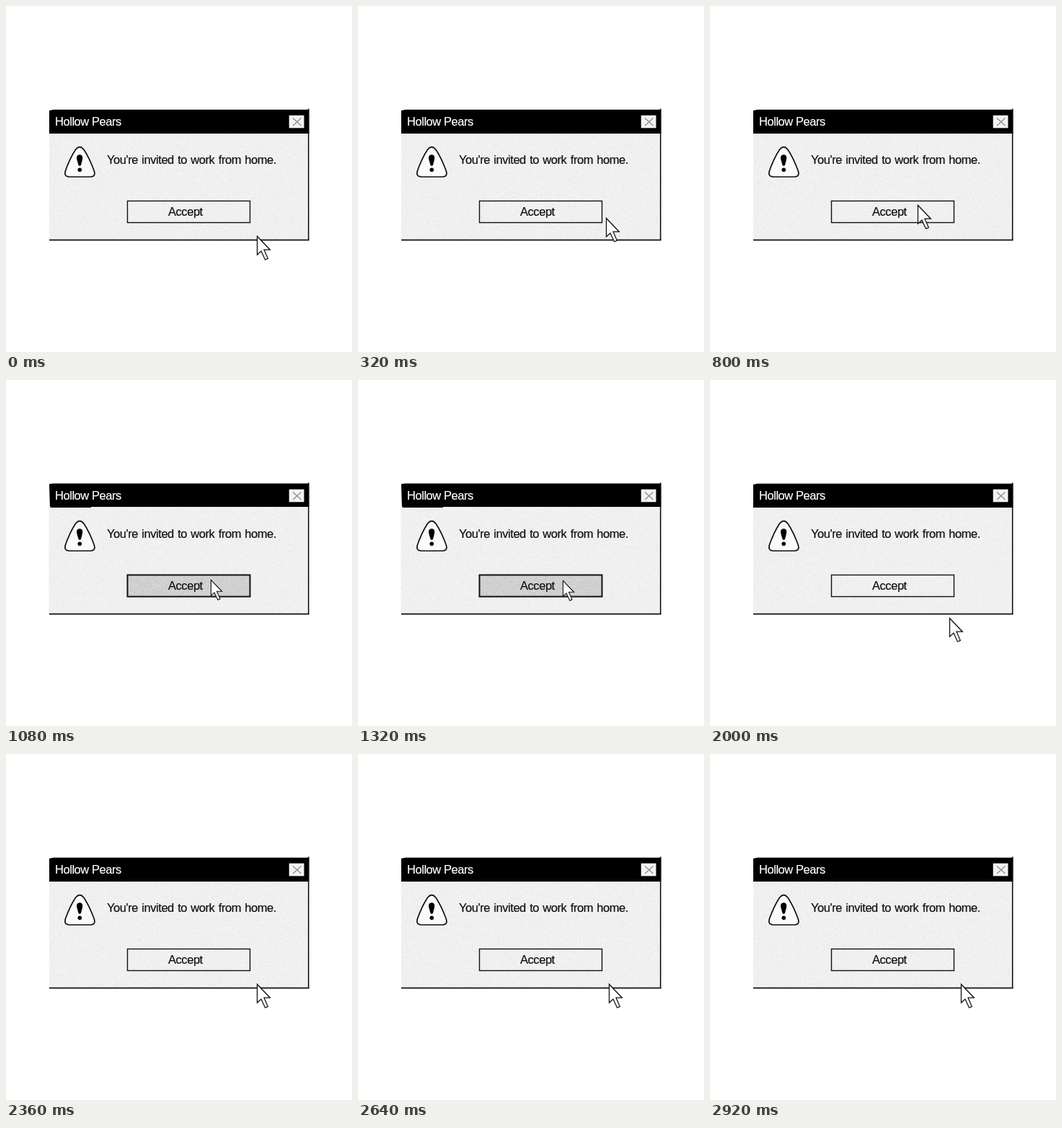
Animation of 480x480 px, one loop 2.96 s. Source, as an HTML page with a canvas:

```html
<!DOCTYPE html>
<html lang="en">
<head>
<meta charset="utf-8">
<title>Dialog invitation</title>
<style>
  html, body { margin: 0; width: 100%; height: 100%; overflow: hidden; background: #fff; }
  canvas, svg { position: absolute; left: 0; top: 0; width: 480px; height: 480px; }
  text {
    font-family: "Liberation Sans", Arial, sans-serif; font-size: 16.5px; letter-spacing: -.45px;
    fill: #111; stroke: #111; stroke-width: .2px;
  }
  .title { fill: #fff; stroke: #fff; }
  .message { word-spacing: 1.2px; }
</style>
</head>
<body>
<canvas id="panel" width="480" height="480"></canvas>
<svg viewBox="0 0 480 480">
  <path id="bar"/>
  <path d="M419.7 142.5V325" stroke="#111" stroke-width="1.6"/>
  <path d="M60 324.6H420.5" stroke="#111" stroke-width="1.6"/>
  <text class="title" x="68" y="165.5">Hollow Pears</text>

  <rect x="392.7" y="151.7" width="20.8" height="17.6" fill="#f3f3f3"/>
  <path d="M398 155.5L409.5 166M409.5 155.5L398 166" stroke="#8a8a8a" stroke-width="1.2"/>

  <path d="M96.3 199.5Q102.3 191.7 108.2 199.5Q116 211.5 122.2 228.5Q125 236.5 117.5 237H87.5Q80 236.5 82.5 228.5Q88.5 211.5 96.3 199.5Z"
        fill="#fbfbfb" stroke="#111" stroke-width="1.7"/>
  <path d="M102.2 206.3C106 206.3 107 209.5 105.9 213.5L104 220.8Q102.2 223 100.5 220.8L98.5 213.5C97.4 209.5 98.5 206.3 102.2 206.3Z"/>
  <circle cx="102.3" cy="227.3" r="2.8"/>

  <text class="message" x="140" y="218.8">You're invited to work from home.</text>
  <rect id="button" x="168.5" y="270.5" width="170" height="30" fill="none" stroke="#111"/>
  <text x="225" y="291.3">Accept</text>

  <path id="cursor" d="M.5 .5V26L6 21L11.5 33L15.3 31.3L10 19.2H18.3Z"
        fill="#fff" stroke="#111" stroke-width="1.3" stroke-linejoin="miter"/>
</svg>
<script>
const LOOP = 2960, STEP = 40;
const PRESS = 1040, RELEASE = 1480;

// time, x, y of the pointer tip
const path = [
  [0, 348, 319], [80, 348, 318], [320, 344, 294], [560, 314, 278],
  [800, 288, 276], [880, 285, 277], [1320, 284, 278], [1480, 285, 279],
  [1680, 296, 291], [1880, 319, 322], [2040, 336, 331], [2160, 346, 323],
  [2240, 348, 319], [2320, 348, 319], [LOOP, 348, 319]
];

const get = id => document.getElementById(id);
const ctx = get("panel").getContext("2d");
const bar = get("bar"), button = get("button"), cursor = get("cursor");

function random(seed) {
  return () => {
    seed = (Math.imul(seed, 1664525) + 1013904223) >>> 0;
    return seed / 4294967296;
  };
}

function makeGrain(size) {
  const tile = document.createElement("canvas");
  tile.width = tile.height = size;
  const c = tile.getContext("2d"), img = c.createImageData(size, size), rnd = random(7);
  for (let i = 0; i < img.data.length; i += 4) {
    const v = rnd() + rnd() - 1;
    img.data[i] = img.data[i + 1] = img.data[i + 2] = v > 0 ? 255 : 0;
    img.data[i + 3] = Math.abs(v) * (v > 0 ? 90 : 11);
  }
  c.putImageData(img, 0, 0);
  return tile;
}
const grain = makeGrain(512);

function slope(i, axis) {
  const a = path[i - 1], b = path[i + 1];
  return a && b ? (b[axis] - a[axis]) / (b[0] - a[0]) : 0;
}

function pointAt(t) {
  let i = 0;
  while (i < path.length - 2 && t >= path[i + 1][0]) i++;
  const a = path[i], b = path[i + 1], d = b[0] - a[0], u = (t - a[0]) / d;
  return [1, 2].map(k => Math.round(
    a[k] * (1 + 2 * u) * (1 - u) ** 2 + b[k] * u * u * (3 - 2 * u) +
    d * u * (1 - u) * (slope(i, k) * (1 - u) - slope(i + 1, k) * u)));
}

const clamp = v => Math.max(0, Math.min(1, v));

function draw(t) {
  const down = t >= PRESS && t < RELEASE;
  const left = down ? 59.4 : 60;

  ctx.clearRect(0, 0, 480, 480);
  ctx.fillStyle = "#f1f1f1";
  ctx.fillRect(left, 144, 420 - left, 180);
  if (down) {
    ctx.fillStyle = "#cfcfcf";
    ctx.fillRect(168, 270, 171, 31);
  }
  const rnd = random(t + 1);
  rnd();
  ctx.drawImage(grain, Math.floor(rnd() * 150), Math.floor(rnd() * 330), 360, 180, 60, 144, 360, 180);

  bar.setAttribute("d", down
    ? "M60 144.3L66 143.4H420.4V176H118V177H62L61 175Z"
    : "M60 145L66 143.8H420.4V177H60Z");
  button.setAttribute("stroke-width", down ? 2 : 1.4);

  const squeeze = clamp((t - PRESS + 80) / 120) * clamp((RELEASE + 80 - t) / 120);
  const [x, y] = pointAt(t);
  cursor.setAttribute("transform", `translate(${x} ${y}) scale(${1 - 0.15 * squeeze})`);
}

let start, shown = -1;
function tick(now) {
  if (start === undefined) start = now;
  const t = Math.floor(((now - start) % LOOP) / STEP) * STEP;
  if (t !== shown) draw(shown = t);
  requestAnimationFrame(tick);
}
draw(0);
requestAnimationFrame(tick);
</script>
</body>
</html>
```
